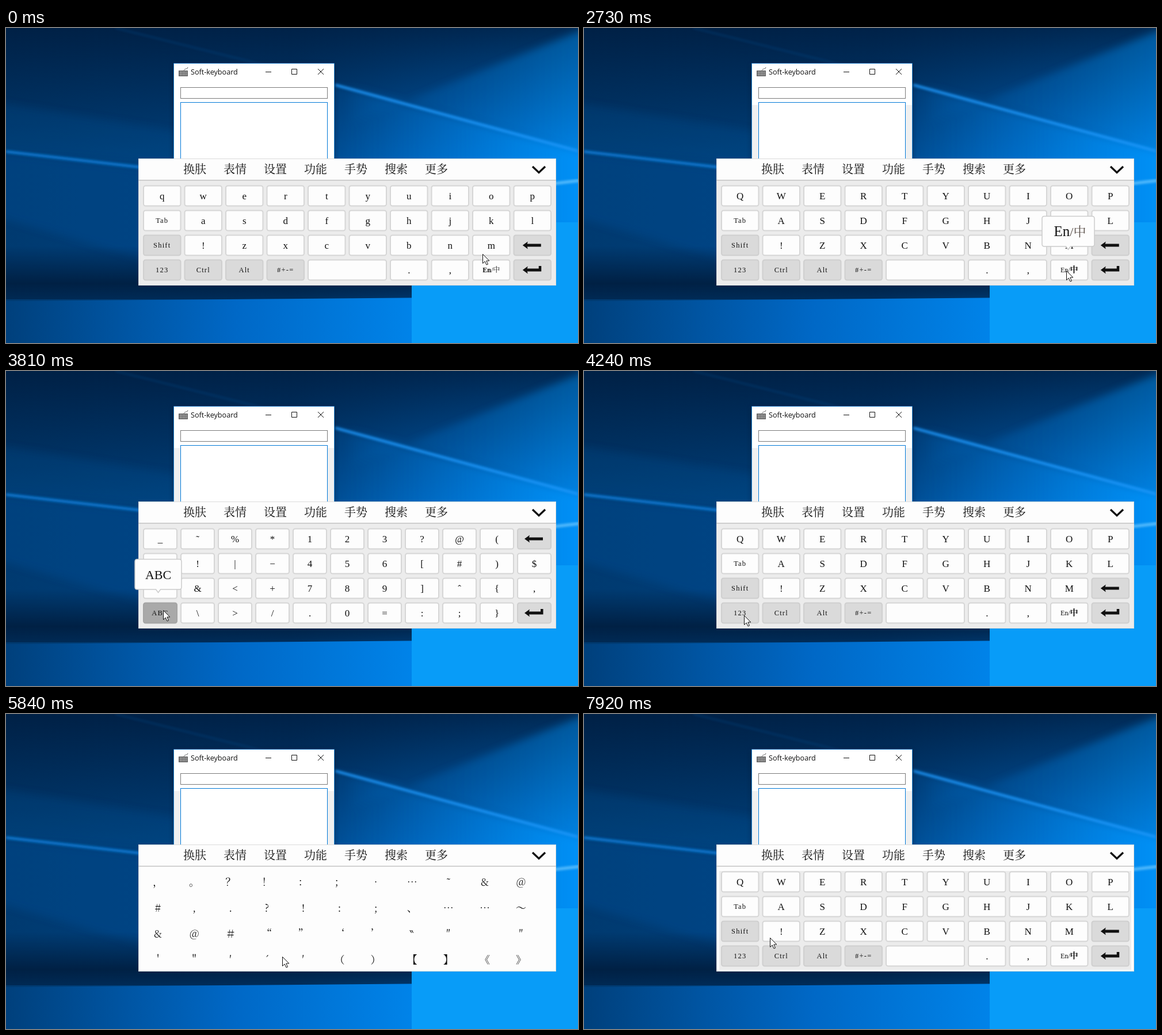
An HTML page for the animation above (8000 ms loop, 994 by 548 pixels).

```html
<!DOCTYPE html>
<html lang="zh-CN">
<head>
<meta charset="utf-8">
<title>Soft-keyboard</title>
<style>
html, body { margin: 0; width: 100%; height: 100%; overflow: hidden; background: #003263; }
svg { display: block; width: 994px; height: 548px; }
text { text-anchor: middle; fill: #111; font-family: "Liberation Serif", "Noto Serif CJK SC", "Noto Sans CJK SC", serif; }
.title { text-anchor: start; font: 12.6px "Open Sans", sans-serif; }
.menu text { font: 300 20px "Noto Serif CJK SC", "Noto Sans CJK SC", "Noto Sans CJK", sans-serif; }
.key { fill: #fdfdfd; stroke: #d6d6d6; stroke-width: 2; }
.key.fn { fill: #dadada; stroke: #cfcfcf; }
.key.down { fill: #a9a9a9; stroke: #a4a4a4; }
.big { font-size: 17px; }
.small { font-size: 12.5px; letter-spacing: 1.2px; }
.pop { font-size: 22px; }
.punct text { font: 500 18px "Noto Serif CJK SC", "Noto Sans CJK SC", "Noto Sans CJK", serif; }
.line { fill: none; stroke: #111; }
</style>
</head>
<body>
<svg id="stage" viewBox="0 0 994 548">
  <defs>
    <linearGradient id="sky">
      <stop offset="0" stop-color="#003a70"/><stop offset=".5" stop-color="#00427f"/>
      <stop offset=".8" stop-color="#0060b4"/><stop offset="1" stop-color="#007ada"/>
    </linearGradient>
    <linearGradient id="night" x2="0" y2="1">
      <stop offset="0" stop-color="#001c3e" stop-opacity=".85"/><stop offset="1" stop-color="#001c3e" stop-opacity="0"/>
    </linearGradient>
    <linearGradient id="ray">
      <stop offset="0" stop-color="#0078dc" stop-opacity=".1"/><stop offset="1" stop-color="#0094fa" stop-opacity=".9"/>
    </linearGradient>
    <linearGradient id="shade" x2="0" y2="1">
      <stop offset="0" stop-color="#001c3c" stop-opacity="0"/><stop offset=".7" stop-color="#001c3c" stop-opacity=".85"/>
      <stop offset="1" stop-color="#001c3c" stop-opacity=".55"/>
    </linearGradient>
    <linearGradient id="floor">
      <stop offset="0" stop-color="#00407c"/><stop offset=".4" stop-color="#0068c6"/><stop offset=".72" stop-color="#0084ea"/>
    </linearGradient>
    <filter id="soft" x="-10%" y="-30%" width="120%" height="160%"><feGaussianBlur stdDeviation="7"/></filter>
    <filter id="glow" x="-10%" y="-30%" width="120%" height="160%"><feGaussianBlur stdDeviation="2"/></filter>
    <filter id="drop"><feDropShadow dx="0" dy="2" stdDeviation="5" flood-color="#000" flood-opacity=".4"/></filter>
  </defs>

  <rect width="994" height="548" fill="url(#sky)"/>
  <rect width="994" height="230" fill="url(#night)"/>
  <g filter="url(#soft)">
    <path d="M1010 0L600 165V100L1010 215Z" fill="url(#ray)" opacity=".5"/>
    <path d="M560 97L1010 218V350H560Z" fill="url(#ray)"/>
    <path d="M-10 130L300 180V240L-10 214Z" fill="#0054a0" opacity=".2"/>
    <path d="M-10 216L300 250V420L-10 330Z" fill="#0058a8" opacity=".25"/>
  </g>
  <path d="M190 0L560 92" stroke="#0a5ba4" stroke-width="2" opacity=".4" filter="url(#glow)"/>
  <path d="M0 215L292 249" stroke="#1183e2" stroke-width="4" filter="url(#glow)"/>
  <path d="M572 99L994 214" stroke="#1c98fb" stroke-width="4" filter="url(#glow)"/>
  <path d="M940 272L1000 265" stroke="#6cc8ff" stroke-width="4" filter="url(#glow)"/>
  <rect y="380" width="994" height="92" fill="url(#shade)"/>
  <path d="M0 475L994 467V548H0Z" fill="url(#floor)"/>
  <rect x="705" y="338" width="290" height="290" fill="#089cf8"/>

  <g filter="url(#drop)"><rect x="292" y="62" width="278" height="200" fill="#fff"/></g>
  <rect id="client" x="292" y="134" width="278" height="100" fill="#f0f0f0"/>
  <path d="M291.5 240V61.5H570.5V240" class="line" style="stroke:#2a86d0"/>
  <g fill="#666">
    <path d="M309 74Q310 71 313 71T316 68" class="line" style="stroke:#777"/>
    <rect x="300" y="74" width="16" height="10"/>
    <path d="M302 76.5H315M302 79H315M302 81.5H315" stroke="#eee" stroke-dasharray="1.5 1"/>
  </g>
  <text class="title" x="321" y="81">Soft-keyboard</text>
  <path class="line" d="M451 76.5H461M496.5 71.5H505.5V80.5H496.5ZM542 71L552 81M552 71L542 81"/>
  <rect x="303.5" y="103.5" width="255" height="19" fill="#fff" stroke="#7a7a7a"/>
  <rect x="303.5" y="129.5" width="255" height="110" fill="#fff" stroke="#0078d7"/>

  <rect x="230" y="227" width="726" height="221" fill="#fdfdfd"/>
  <rect id="tray" fill="#ececec"/>
  <rect x="230.5" y="227.5" width="725" height="220" fill="none" stroke="#dcdcdc"/>
  <path d="M230 264.8H956" class="line" style="stroke:#c4c4c4;stroke-width:1.6"/>
  <g class="menu" id="menu"></g>
  <path class="line" d="M915 241L926 251.5L937 241" stroke-width="3.4"/>
  <g id="pages"></g>
  <g id="pops"></g>
  <path id="arrow" d="M.5 .5V16.5L4.2 13L7 19L9.5 18L6.8 12H11.8Z" fill="#fff" stroke="#111"/>
</svg>
<script>
const $ = id => document.getElementById(id);

function add(parent, tag, attrs, content) {
  const el = document.createElementNS('http://www.w3.org/2000/svg', tag);
  for (const k in attrs) el.setAttribute(k, attrs[k]);
  if (content) el.textContent = content;
  parent.append(el);
  return el;
}

const label = (g, s, x, y, cls = '') => add(g, 'text', { x, y, class: cls }, s);

function langLabel(g, x, y, size, zh, pop) {
  const t = label(g, '', x, y);
  const part = (s, bold, px) => add(t, 'tspan', {
    style: `font-size:${px}px;font-weight:${bold ? 700 : 400};fill:${pop && s !== 'En' ? '#554a44' : '#111'}`
  }, s);
  part('En', !zh && !pop, pop ? size + 3 : size);
  part('/', false, size);
  part('中', zh && !pop, zh ? size + 2 : size);
}

function icon(g, cx, cy, enter) {
  const hook = enter ? 'V-7H15.5V2.5' : 'V2.5';
  add(g, 'path', {
    transform: `translate(${cx} ${cy})`, fill: '#111',
    d: `M-17 0L-8 -6.5L-9 -2.5H${enter ? 11 : 15}${hook}H-9L-8 6.5Z`
  });
}

const FN = ['Shift', '123', 'Ctrl', 'Alt', '#+-=', 'ABC', 'BACK', 'ENTER'];

function keyPage(name, rows, pitch, width, zh) {
  const g = add($('pages'), 'g', { id: name });
  rows.forEach((row, r) => {
    let col = 0;
    for (const k of row) {
      const span = k === ' ' ? 2 : 1;
      const x = 239 + col * pitch, w = width + (span - 1) * pitch;
      const cx = x + w / 2 - .5, cy = 292 + r * 43;
      const box = add(g, 'rect', {
        x, y: cy - 17.5, width: w - 1, height: 35, rx: 3.5,
        class: 'key' + (FN.includes(k) ? ' fn' : '')
      });
      if (k === 'BACK' || k === 'ENTER') icon(g, cx, cy, k === 'ENTER');
      else if (k === 'LANG') langLabel(g, cx, cy + 4, 12, zh);
      else label(g, k, cx, cy + (k.length > 1 ? 4 : 6), k.length > 1 ? 'small' : 'big');
      if (k === '123' || k === 'ABC' || k === '#+-=') box.dataset.key = k;
      col += span;
    }
  });
}

function letters(zh) {
  const abc = s => [...(zh ? s.toUpperCase() : s)];
  return [
    abc('qwertyuiop'),
    ['Tab', ...abc('asdfghjkl')],
    ['Shift', '!', ...abc('zxcvbnm'), 'BACK'],
    ['123', 'Ctrl', 'Alt', '#+-=', ' ', '.', ',', 'LANG', 'ENTER']
  ];
}

keyPage('en', letters(false), 71.5, 65.5, false);
keyPage('zh', letters(true), 71.5, 65.5, true);
keyPage('sym', [
  [...'_˜%*123?@(', 'BACK'],
  [...'\'!|−456[#)$'],
  [...'"&<+789]ˆ{,'],
  ['ABC', ...'\\>/.0=:;}', 'ENTER']
], 65, 59);

const punct = add($('pages'), 'g', { id: 'punct', class: 'punct' });
['，。？！：；•…˜&@', '#,.?!:;、……～', '&@＃“”‘’‶″ ″', '\'"′´′（）【】《》'].forEach((row, r) =>
  [...row].forEach((c, i) => label(punct, c, 264 + 63.1 * i, 299 + 45 * r)));

['换肤', '表情', '设置', '功能', '手势', '搜索', '更多'].forEach((s, i) =>
  label($('menu'), s, 328 + 70 * i, 253));

// Magnified key bubble: [left, width]
const POPS = { LANG: [796, 91], 123: [224, 81], ABC: [224, 81], '#+-=': [440, 91] };
for (const k in POPS) {
  const [x, w] = POPS[k], c = x + w / 2;
  const g = add($('pops'), 'g', { id: 'pop' + k });
  add(g, 'path', {
    d: `M${x + 4} 327.5H${x + w - 4}q4 0 4 4V376q0 4 -4 4H${c + 4}L${c} 385.5L${c - 4} 380H${x + 4}q-4 0 -4 -4V331.5q0 -4 4 -4Z`,
    fill: '#fdfdfd', stroke: '#cccccc', 'stroke-width': 1.5
  });
  if (k === 'LANG') langLabel(g, c + 3, 362, 22, false, true);
  else label(g, k, c, 362, 'pop');
}

// Runs of screen updates: [start, end, steps]
const RUNS = [[0, 0, 1], [120, 1020, 8], [1170, 1170, 1], [1450, 2450, 8], [2600, 3530, 8],
  [3680, 4510, 7], [4790, 5690, 8], [5840, 6800, 8], [6920, 7920, 9]];

function snap(t) {
  const [a, b, n] = RUNS.filter(r => r[0] <= t).pop();
  if (n === 1) return a;
  const step = (b - a) / (n - 1);
  return a + step * Math.min(n - 1, Math.floor((t - a + 16) / step));
}

// Pointer path: [time, x, y]
const PATH = [[0, 828, 393], [120, 834, 403], [249, 838, 415], [377, 838, 416], [506, 730, 402],
  [763, 236, 372], [892, 254, 345], [1020, 308, 310], [1170, 364, 297], [1450, 374, 302],
  [1735, 401, 315], [2021, 650, 430], [2164, 780, 445], [2307, 838, 428], [2600, 838, 422],
  [2866, 838, 422], [3264, 290, 420], [3397, 273, 416], [3819, 273, 416], [4095, 276, 424],
  [4510, 282, 426], [4790, 281, 424], [5176, 280, 422], [5433, 430, 429], [5562, 478, 424],
  [5840, 480, 422], [6114, 590, 390], [6663, 900, 256], [6800, 918, 243], [7170, 918, 243],
  [7795, 350, 380], [7920, 323, 389]];

function pointer(t) {
  const i = PATH.findIndex(p => p[0] > t);
  if (i < 0) return PATH[PATH.length - 1].slice(1);
  const [a, b] = [PATH[i - 1], PATH[i]];
  const f = (t - a[0]) / (b[0] - a[0]);
  return [1, 2].map(j => Math.round(a[j] + (b[j] - a[j]) * f));
}

// Visible page and pressed key: [time, page, key]
const STATES = [[0, 'en'], [370, 'en', 'LANG'], [500, 'zh'], [2300, 'en', 'LANG'], [2440, 'en'],
  [2600, 'zh', 'LANG'], [2860, 'zh'], [3390, 'zh', '123'], [3520, 'sym'], [3680, 'sym', 'ABC'],
  [3950, 'zh'], [5555, 'zh', '#+-='], [5840, 'punct'], [7160, 'zh']];

const show = (el, on) => { el.style.display = on ? '' : 'none'; };

function frame() {
  const t = snap(performance.now() % 8000);
  const [, page, key] = STATES.filter(s => s[0] <= t).pop();
  for (const g of $('pages').children) show(g, g.id === page);
  for (const g of $('pops').children) show(g, g.id === 'pop' + key);
  for (const k of document.querySelectorAll('[data-key]')) k.classList.toggle('down', k.dataset.key === key);
  show($('client'), t >= 120);
  show($('tray'), page !== 'punct');
  const [x, y, w, h] = t >= 7160 ? [235, 273, 716, 172] : [231, 265, 724, 182];
  for (const [n, v] of Object.entries({ x, y, width: w, height: h })) $('tray').setAttribute(n, v);
  $('arrow').setAttribute('transform', `translate(${pointer(t)})`);
  requestAnimationFrame(frame);
}
frame();
</script>
</body>
</html>
```
